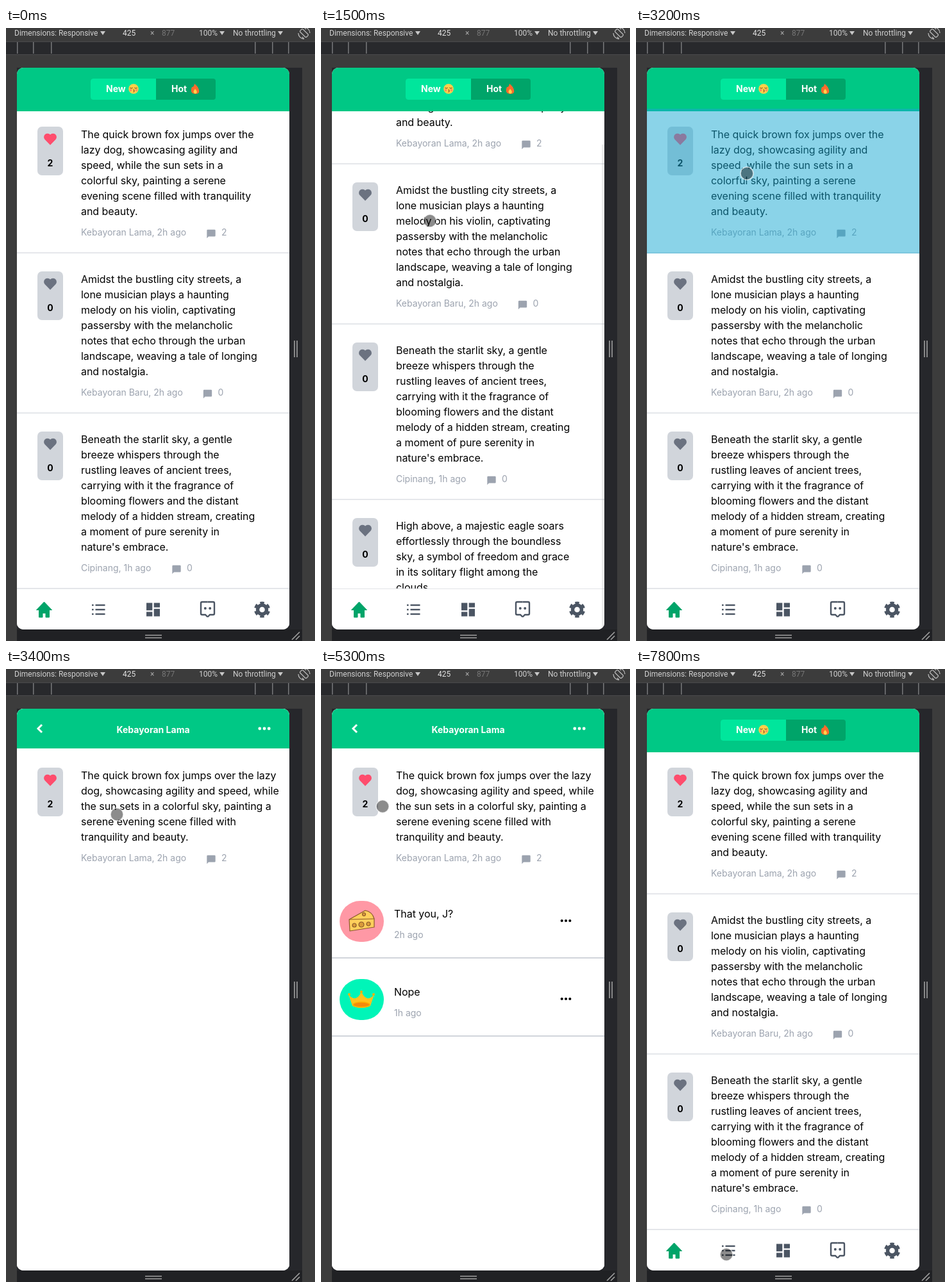
Recreate the animation shown at these times as an HTML page. Size 482 by 957 pixels, loop 8 s.

```html
<!DOCTYPE html>
<html lang="en">
<head>
<meta charset="utf-8">
<style>
  html, body { margin: 0; width: 100%; height: 100%; overflow: hidden; background: #3c3c3c; }
  svg { display: block; font-family: Inter, sans-serif; }
  .ui { font-family: Roboto, sans-serif; }
  .body { letter-spacing: -.04px; }
</style>
</head>
<body>
<svg id="stage" width="482" height="957" viewBox="0 0 482 957"></svg>
<script>
const GREEN = '#00c885', DEEP = '#00a469', SLATE = '#4b5563', MUTED = '#9ca3af';

// Text is placed by the middle of its capitals.
const text = (x, mid, size, fill, str, attrs = '') =>
  `<text x="${x}" y="${Math.round(mid + size * .364)}" font-size="${size}" fill="${fill}" ${attrs}>${str}</text>`;
const rect = (x, y, w, h, fill, attrs = '') =>
  `<rect x="${x}" y="${y}" width="${w}" height="${h}" fill="${fill}" ${attrs}/>`;
const path = (d, fill, attrs = '') => `<path d="${d}" fill="${fill}" ${attrs}/>`;
const line = (d, stroke, width) => path(d, 'none', `stroke="${stroke}" stroke-width="${width}"`);
const circle = (x, y, r, fill, attrs = '') => `<circle cx="${x}" cy="${y}" r="${r}" fill="${fill}" ${attrs}/>`;
const group = (content, attrs = '') => `<g ${attrs}>${content}</g>`;
const place = (x, y, content) => group(content, `transform="translate(${x} ${y})"`);
const dots = (x, y, gap, r, fill) => [-gap, 0, gap].map(d => circle(x + d, y, r, fill)).join('');
const mirror = content => content + group(content, 'transform="scale(-1 1)"');
const halfTurn = content => content + group(content, 'transform="rotate(180)"');

const HEART = 'M12 21.3L3.500 12.600A5.500 5.500 0 0 1 12 5.100A5.500 5.500 0 0 1 20.500 12.600Z';
const BUBBLE = 'M2 22V4q0-2 2-2h16q2 0 2 2v12q0 2-2 2H6z';

const posts = [
  { likes: 2, meta: 'Kebayoran Lama, 2h ago', iconX: 312, replies: 2, lines: 'The quick brown fox jumps over the|lazy dog, showcasing agility and|speed, while the sun sets in a|colorful sky, painting a serene|evening scene filled with tranquility|and beauty.' },
  { likes: 0, meta: 'Kebayoran Baru, 2h ago', iconX: 306.5, replies: 0, lines: 'Amidst the bustling city streets, a|lone musician plays a haunting|melody on his violin, captivating|passersby with the melancholic|notes that echo through the urban|landscape, weaving a tale of longing|and nostalgia.' },
  { likes: 0, meta: 'Cipinang, 1h ago', iconX: 258, replies: 0, lines: "Beneath the starlit sky, a gentle|breeze whispers through the|rustling leaves of ancient trees,|carrying with it the fragrance of|blooming flowers and the distant|melody of a hidden stream, creating|a moment of pure serenity in|nature's embrace." },
  { likes: 0, lines: 'High above, a majestic eagle soars|effortlessly through the boundless|sky, a symbol of freedom and grace|in its solitary flight among the|clouds.' },
];
const openedLines = 'The quick brown fox jumps over the lazy|dog, showcasing agility and speed, while|the sun sets in a colorful sky, painting a|serene evening scene filled with|tranquility and beauty.';

function post({ likes, meta, iconX, replies, lines }, top) {
  const rows = lines.split('|');
  const metaY = top + 28 + rows.length * 24 + 21;
  return rect(49, top + 28, 40, 76, '#d1d5db', 'rx="7"')
    + place(57, top + 35.5, path(HEART, likes ? '#ff4d6d' : '#6b7280'))
    + text(69, top + 85, 14, '#000', likes, 'font-weight="700" text-anchor="middle"')
    + rows.map((row, i) => text(117, top + 40 + i * 24, 16, '#000', row, 'class="body"')).join('')
    + (meta ? text(117, metaY, 14, MUTED, meta) + text(iconX + 24, metaY, 14, MUTED, replies)
      + place(iconX, metaY - 5.5, path(BUBBLE, MUTED, 'transform="scale(.667)"')) : '');
}

function feed() {
  let top = 126;
  return posts.map(p => {
    const start = top;
    top += p.lines.split('|').length * 24 + 82;
    return post(p, start) + rect(17, top - 2, 425, 2, '#e5e7eb');
  }).join('');
}

// Small drawings around their own centre.
const kissFace = circle(0, 0, 7.8, '#ffcf4a')
  + mirror(line('M1.500-2q2 2.500 4 0', '#6b4423', 1.2) + circle(4.5, 2, 1.8, '#ff8a65'))
  + line('M-.5 1q3 1 .5 2q3 1-.5 2', '#7a3b2a', 1);
const flame = path('M-1-8Q4-4 5-1Q9 8 0 8Q-9 7-5-3Q-2-2-1-8Z', '#ff6b2c') + path('M0 0Q6 7 0 7.500Q-5 6 0 0Z', '#ffd54a');
const cheese = group(path('M-19-3L6-17Q17-15 20-4V9L-18 15Z', '#ffcf5c') + path('M-19-3L20-4', 'none')
  + [-11, 0, 11].map((x, i) => circle(x, 6 - i, 3 + i % 2, '#d99a3a')).join('') + circle(4, -11, 2.5, '#d99a3a'),
  'stroke="#8a5a2b" stroke-width="1.200" stroke-linejoin="round"');
const crown = mirror(path('M0-13Q3-4 9-2Q15-1 20-8L14 10Q8 13 0 13Z', '#ffc21f') + circle(19, -8, 2, '#ffb000'))
  + circle(0, -12, 2, '#ffb000') + '<ellipse cy="8" rx="13" ry="4" fill="#f58a0b" stroke="#ffb000" stroke-width="1.5"/>';
const home = path('M0-12L-12 .5h4V12h5.500V5.500h5V12h5.500V.5h4z', DEEP, `stroke="${DEEP}" stroke-linejoin="round"`);
const list = [-7, 0, 7].map(y => rect(-10.5, y - 1.2, 2.6, 2.4, SLATE) + rect(-5, y - 1.2, 15, 2.4, SLATE)).join('');
const grid = halfTurn(rect(-10.5, -10.5, 9.3, 11.7, SLATE) + rect(1.2, -10.5, 9.3, 7, SLATE));
const chat = mirror(line('M0-12h8.500q2 0 2 2v16q0 2-2 2h-5L0 11.500', SLATE, 2.4) + circle(3.7, -2, 2, SLATE));
const gear = group(circle(0, 0, 7, 'none', 'stroke-width="5.500"')
  + circle(0, 0, 10.6, 'none', 'stroke-width="4" pathLength="6" stroke-dasharray=".56 .44" stroke-dashoffset=".28" transform="rotate(30)"'),
  `stroke="${SLATE}"`);
const rotateIcon = group(rect(-3, -7, 6, 14, 'none', 'rx="1.5" transform="rotate(-45)"')
  + halfTurn(path('M0-9A9 9 0 0 1 9 0M0-9l3 3', 'none')), 'stroke="#b8b8b8" stroke-width="1.300"');

const feedHeader = rect(17, 62, 425, 68, GREEN)
  + rect(132, 79, 195, 33, DEEP, 'rx="4"') + rect(132, 79, 12, 33, '#00e69c', 'rx="4"') + rect(136, 79, 98, 33, '#00e69c')
  + text(156, 95, 14, '#fff', 'New', 'font-weight="700"') + place(199, 95, kissFace)
  + text(258, 95, 14, '#fff', 'Hot', 'font-weight="700"') + place(295, 95, flame);
const nav = rect(17, 875, 425, 64, '#fff') + rect(17, 875, 425, 1, '#e2e4e8')
  + [home, list, grid, chat, gear].map((icon, i) => place(59.5 + 85 * i, 908, icon)).join('');

const comment = (y, color, art, message, age) =>
  rect(29, y - 32, 69, 64, color, 'rx="32"') + place(63, y, art)
  + text(114, y - 12, 16, '#000', message, 'class="body"') + text(114, y + 21, 14, MUTED, age)
  + dots(382, y - 1, 6.3, 2.1, '#000') + rect(17, y + 56, 425, 2, '#d1d5db');
const comments = comment(394, '#ff98a5', cheese, 'That you, J?', '2h ago')
  + comment(516, '#00f5b8', crown, 'Nope', '1h ago');
const detail = rect(17, 62, 425, 877, '#fff') + rect(17, 62, 425, 62, GREEN)
  + line('M56 87L50 93L56 99', '#fff', 3)
  + text(229.5, 95, 14, '#fff', 'Kebayoran Lama', 'font-weight="700" text-anchor="middle"')
  + dots(403, 93, 7.2, 2.4, '#fff')
  + post({ ...posts[0], lines: openedLines }, 126);

const caret = x => path(`M${x} 5h8l-4 6z`, '#c8c8c8');
const label = (x, str, fill = '#d0d0d0') => text(x, 8, 12, fill, str, 'class="ui"');
const devtools = rect(0, 0, 482, 957, '#3c3c3c') + rect(0, 21, 482, 21, '#4a4a4c') + rect(0, 22, 482, 19, '#28292c')
  + [17, 42, 70, 388, 415, 440].map(x => rect(x, 22, 1.5, 18, '#77787a')).join('')
  + rect(17, 62, 445, 895, '#26272b') + rect(17, 939, 445, 18, '#202124')
  + label(13, 'Dimensions: Responsive') + caret(147) + label(182, '425', '#e3e3e3') + label(225, '×', '#aaa') + label(243, '877', '#777')
  + label(301, '100%') + caret(333) + label(354, 'No throttling') + caret(424) + place(465, 8, rotateIcon)
  + line('M450 488v26M454 488v26M217 948h26M217 952h26M446 955l12-12M452 955l6-6', '#a0a0a0', 1.6);

const tint = 'rgb(23 168 210 / .5)';
document.getElementById('stage').innerHTML =
  '<clipPath id="screen"><rect x="17" y="62" width="425" height="877" rx="10"/></clipPath>' + devtools
  + group(rect(17, 62, 425, 877, '#fff') + group(feed(), 'id="feed"') + feedHeader + nav
    + group(detail + group(comments, 'id="comments"'), 'id="detail"')
    + rect(438, 62, 4, 757, 'rgb(128 128 128 / .6)', 'id="bar"')
    + rect(17, 126, 425, 226, tint, 'id="postTap"') + rect(41, 81, 24, 24, tint, 'id="backTap"')
    + group(rect(339, 62, 103, 25, 'rgb(255 255 255 / .8)') + text(345, 75, 14, '#333', '425px × 877px', 'class="ui"'), 'id="size"')
    + circle(0, 0, 10, 'rgb(0 0 0 / .45)', 'id="pointer" stroke="#fff" stroke-opacity=".65" stroke-width="1.5"'), 'clip-path="url(#screen)"');

const clamp = (v, low, high) => Math.min(high, Math.max(low, v));
const smooth = f => f * f * (3 - 2 * f);
const flick = f => 1 - (1 - f) ** 4.8;

// The hand's gestures: when each starts and ends, and where it leads.
const rest = { x: 190, y: 470 };
const gestures = [
  { from: 400, to: 1200, x: 170, y: 301 },
  { from: 1500, to: 2100, x: 157, y: 468 },
  { from: 2800, to: 2900, x: 173, y: 227 },
  { from: 4100, to: 4700, x: 164, y: 394, ease: flick },
  { from: 4900, to: 5600, x: 52, y: 98 },
  { from: 6500, to: 7100, x: 268, y: 890 },
  { from: 7100, to: 7800, x: 141, y: 914 },
];
const [dragUp, dragDown] = gestures;
const MAX_SCROLL = 139, SLOP = 14;

function pointerAt(t) {
  let { x, y } = rest;
  for (const g of gestures) {
    const f = (g.ease || smooth)(clamp((t - g.from) / (g.to - g.from), 0, 1));
    x += (g.x - x) * f;
    y += (g.y - y) * f;
  }
  return { x, y };
}

// The page follows the finger once it has moved past the touch slop.
function scrollAt(t, y) {
  if (t >= dragDown.to) return 0;
  const moved = t < dragDown.from ? rest.y - y - SLOP : MAX_SCROLL - Math.max(0, y - dragUp.y - SLOP);
  return clamp(moved, 0, MAX_SCROLL);
}

function barOpacity(t) {
  if (t <= dragUp.from || t >= 2900) return 0;
  const drag = t > dragDown.from ? dragDown : dragUp;
  return clamp(1 - (t - drag.to) / 400, .25, 1);
}

const set = (id, name, value) => document.getElementById(id).setAttribute(name, value);
const move = (id, x, y) => set(id, 'transform', `translate(${x} ${y})`);
const fade = (id, opacity) => set(id, 'opacity', Number(opacity));

function draw(now) {
  const t = Math.floor(now % 8000 / 100) * 100; // the screen refreshes ten times a second
  const during = (from, to) => t >= from && t < to;
  const { x, y } = pointerAt(t);
  const scroll = scrollAt(t, y);
  move('pointer', x, y);
  move('feed', 0, -Math.round(scroll));
  move('bar', 0, scroll * 877 / 1016);
  fade('bar', barOpacity(t));
  fade('pointer', t >= 400);
  fade('postTap', during(3200, 3300) ? 1 : during(3300, 3400) ? .6 : 0);
  fade('detail', during(3400, 6100));
  fade('comments', t >= 3500);
  fade('backTap', during(5900, 6100));
  fade('size', during(6200, 6400));
  requestAnimationFrame(draw);
}
requestAnimationFrame(draw);
</script>
</body>
</html>
```
